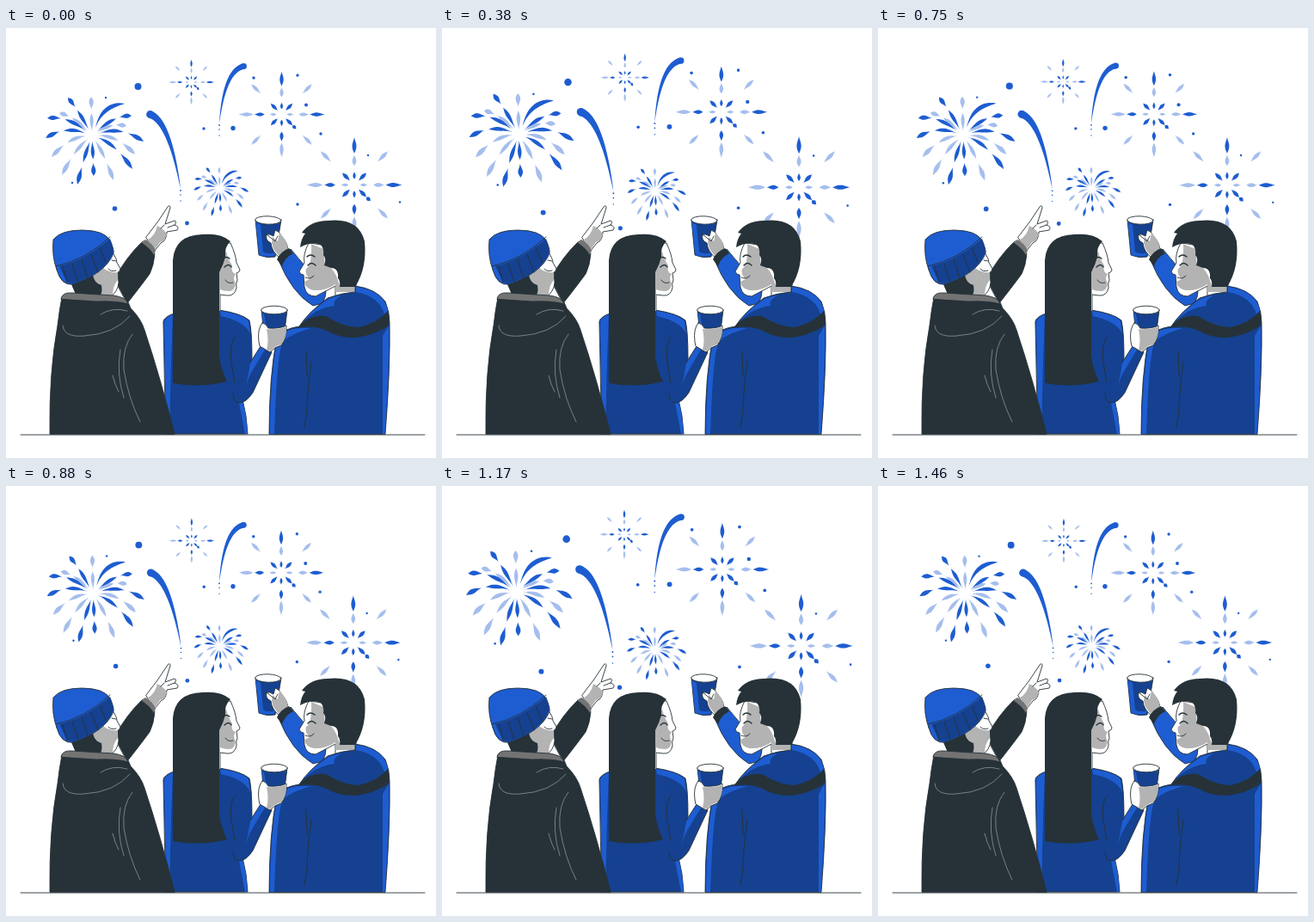
An HTML page with a canvas for the animation above (1500 ms loop, 500 px wide and 500 px high).

```html
<!DOCTYPE html>
<html>
<head>
<meta charset="utf-8">
<style>
html, body { margin: 0; width: 100%; height: 100%; overflow: hidden; background: #fff; }
canvas { display: block; width: 500px; height: 500px; }
</style>
</head>
<body>
<canvas id="stage"></canvas>
<script>
const canvas = document.getElementById('stage');
const ctx = canvas.getContext('2d');
const ratio = window.devicePixelRatio || 1;
canvas.width = canvas.height = 500 * ratio;

const BRIGHT = '#1e5dd1', DEEP = '#154190', PALE = '#a5beed';
const INK = '#263238', SHADE = '#b3b3b3', WHITE = '#fff', GREY = '#737373';
const LOOP = 1500, FPS = 24, FRAMES = 36;

function shape(d, fill, stroke = INK, width = 0.9) {
  const path = new Path2D(d);
  if (fill) { ctx.fillStyle = fill; ctx.fill(path); }
  if (stroke) { ctx.strokeStyle = stroke; ctx.lineWidth = width; ctx.stroke(path); }
}
const line = (d, color = INK, width = 0.9) => shape(d, null, color, width);
const flat = (d, color) => shape(d, color, null);

function dot(x, y, r, color = BRIGHT) {
  ctx.fillStyle = color;
  ctx.beginPath();
  ctx.arc(x, y, r, 0, 7);
  ctx.fill();
}

function rim(x, y, rx, ry, tilt) {
  const path = new Path2D();
  path.ellipse(x, y, rx, ry, tilt, 0, 7);
  shape(path, WHITE);
}

// Fills a ribbon along a quadratic curve between u = from and u = to.
function ribbon([ax, ay], [bx, by], [cx, cy], from, to, halfWidth, color) {
  const left = [], right = [], steps = 18;
  for (let i = 0; i <= steps; i++) {
    const v = i / steps, u = from + (to - from) * v, w = 1 - u;
    const x = w * w * ax + 2 * w * u * bx + u * u * cx;
    const y = w * w * ay + 2 * w * u * by + u * u * cy;
    const dx = w * (bx - ax) + u * (cx - bx), dy = w * (by - ay) + u * (cy - by);
    const k = halfWidth(v) / (Math.hypot(dx, dy) || 1);
    left.push([x - dy * k, y + dx * k]);
    right.unshift([x + dy * k, y - dx * k]);
  }
  ctx.fillStyle = color;
  ctx.beginPath();
  [...left, ...right].forEach(p => ctx.lineTo(...p));
  ctx.fill();
}

function arm(x, y, color) {
  const bend = [x * 0.5, y * 0.45 - Math.abs(x) * 0.3];
  const drop = size => v => size * Math.sin(Math.PI * v ** 1.4) ** 1.15;
  ribbon([0, 0], bend, [x, y], 0.13, 0.61, drop(2.1), color);
  ribbon([0, 0], bend, [x, y], 0.69, 1, drop(2.6), color);
}

function palm(x, y, scale) {
  ctx.save();
  ctx.translate(x, y);
  ctx.scale(scale, scale);
  [[-1, -46], [40, -12], [50, 21], [25, 51], [-35, 45], [-47, 24], [-38, -27]]
    .forEach(p => arm(...p, PALE));
  [[-54, 2], [-52, -21], [-28, -45], [46, -24], [60, 6], [47, 38], [-17, 56], [2, 46]]
    .forEach(p => arm(...p, BRIGHT));
  ribbon([4, -10], [12, -37], [38, -38], 0, 1, v => 2.5 * Math.sin(Math.PI * v ** 1.4) ** 0.8, BRIGHT);
  ctx.restore();
}

function burst(x, y, radius) {
  const ray = (angle, from, to, width, color, skew = 0.85) => {
    const at = r => [x + Math.cos(angle) * r * radius, y + Math.sin(angle) * r * radius];
    ribbon(at(from), at((from + to) / 2), at(to), 0, 1,
      v => width * radius * Math.sin(Math.PI * v ** skew) ** 1.3, color);
  };
  for (let i = 0; i < 4; i++) {
    const angle = i * Math.PI / 2, diagonal = angle + Math.PI / 4;
    const outer = i === 0 || i === 3 ? BRIGHT : PALE;
    ray(angle, 0.66, 1, 0.044, outer);
    ray(angle, 0.4, 0.63, 0.042, outer === BRIGHT ? PALE : BRIGHT);
    ray(angle, 0.12, 0.28, 0.03, i % 2 ? BRIGHT : PALE);
    ray(diagonal, 0.68, 1, 0.04, PALE, 1.2);
    ray(diagonal, 0.12, 0.36, 0.04, BRIGHT, 1.2);
  }
  ray(Math.PI / 4, 0.36, 0.48, 0.042, BRIGHT);
}

function trail(head, bend, tail, size) {
  ribbon(head, bend, tail, 0, 1, v => size * (1 - v) ** 0.8, BRIGHT);
  dot(...head, size);
  [2, 7, 14].forEach((gap, i) => dot(tail[0], tail[1] + gap, 0.9 - i * 0.1));
}

function sky() {
  palm(100, 126, 1);
  palm(248.5, 187.5, 0.56);
  burst(215.5, 63, 26.5);
  burst(320.5, 100.5, 50);
  burst(405, 182.5, 55.5);
  trail([167.5, 100.5], [190, 108], [203, 187], 4.4);
  trail([276.5, 44.5], [254, 49], [248, 111], 3.4);
  dot(153.5, 68, 4);
  dot(126.5, 210, 2.8);
  dot(210.5, 227, 2.4);
  dot(264, 116.5, 2.7);
  dot(349, 89.5, 2);
  [[230, 117], [288, 58], [339, 55], [366, 123], [339, 205]].forEach(p => dot(...p, 1.7));
  [[77, 180], [116, 81], [421, 148], [458, 202.5], [223, 70]].forEach(p => dot(...p, 1.2));
}

function woman() {
  shape('M183 341Q184 336 195 332L248 328Q274 332 283 340Q286 352 286 384L275 432Q280 450 281 472H186Z', DEEP);
  flat('M184 341Q186 336 194 333L192 385 190 472H186Z', BRIGHT);
  flat('M249 329Q275 333 282 341L284 356Q278 341 250 335Z', BRIGHT);
  flat('M271 436L278 472H280.5Q280 450 275 434Z', BRIGHT);
  shape('M284 389L296 370Q304 372 309 377L287 424Q279 436 271 436Q264 434 264 425', DEEP);
  flat('M284 390L296 371 301 374 285 401Q281 407 278 423Z', BRIGHT);
  line('M266 360Q259 370 262 389L266 412');

  shape('M250 250H261Q267 263 268 273L272 281Q272 284 268 285L269 293Q267 297 268 302Q266 312 257 311L249 310V329H243Z', WHITE);
  flat('M246 282L256 259Q258 269 263 276Q261 284 267 286Q263 291 267 297Q266 306 259 306Q253 306 249 304V329H244Z', SHADE);
  flat('M194 413V270Q196 241 228 240Q250 238 261 248Q254 254 255 266Q253 275 248 284V382Q251 400 257 411Q226 419 194 413Z', INK);
  line('M253 268Q256 265 260 268M254 278Q259 273 262 278', INK, 1.4);
  line('M255 293Q258 298 264 296');

  shape('M297 328L301 367H322L327 328Z', DEEP);
  flat('M297.5 331L300 333 303 350H300Z', BRIGHT);
  rim(312, 328, 15.3, 4.8, 0);
  shape('M298 343Q292 350 294 365L295 370 307 377Q312 371 320 369Q327 360 326 346Q318 350 305 349Q302 343 298 343Z', WHITE);
  flat('M303 350Q317 351 326 347Q327 359 320 368Q312 370 307 376L303 374Q306 364 303 350Z', SHADE);
}

function pointingMan() {
  shape('M163 243L176 226 188 208Q191 205 191 209L185 228 196 224Q199 225 196 229Q202 231 199 235L187 237Q187 247 180 250L172 260Z', WHITE);
  flat('M165 246Q173 242 176 230Q184 234 187 240Q185 248 179 249L172 259Z', SHADE);
  line('M184 229L180 233M196 229L188 232');
  shape('M126 292Q140 266 158 249L173 262Q172 276 167 286Q156 301 141 320Z', INK);
  flat('M157 249L162 246Q171 251 174 259L172 264Q167 255 157 249Z', GREY);

  shape('M112 270L123 260Q129 268 129 273L133 280Q132 284 130 284L131 296Q130 307 121 313L100 309Z', WHITE);
  flat('M101 289Q104 282 112 278Q119 285 130 284L130 293Q124 300 124 311L106 313Z', SHADE);
  flat('M72 288L101 281Q100 296 111 299Q113 309 107 314L82 312Q77 301 72 288Z', INK);
  line('M119 280Q122 284 128 282M123 270L128 271');
  shape('M59 281Q53 265 55 246Q64 235 88 235Q114 235 121 247Q126 258 125 262Q116 285 78 298Q64 300 59 281Z', BRIGHT);
  flat('M62 277Q92 270 121 245Q126 258 124 262Q115 285 78 297L71 296Z', DEEP);
  line('M58 277Q92 270 121 243M66 277L71 296M77 274L84 295M88 269L95 291M99 263L107 284M109 255L117 274');

  shape('M51 472Q50 400 60 346Q62 328 65 313L142 319L145 326Q157 338 161 351Q180 408 196 472Z', INK);
  shape('M64 315Q65 307 77 308L125 311Q140 313 142 321Q129 317 105 318Z', GREY);
  const seam = '#8d9497';
  line('M66 346Q67 360 91 358Q126 356 144 335M110 333Q124 324 141 329', seam, 0.8);
  line('M147 356Q135 371 137 397Q142 430 156 458M133 374Q128 402 137 430M124 404Q127 416 131 423', seam, 0.8);
}

function toastingMan() {
  shape('M290 223L294 264Q303 268 313 266L320 223Z', DEEP);
  flat('M290.5 226L294.5 264Q303 267 312 265L313 261Q304 264 299 260L296 229Z', BRIGHT);
  rim(304.8, 223.5, 15, 4.7, 0.03);
  shape('M303 240Q306 239 311 242L313 235Q318 236 321 243Q327 249 328 258L318 267Q309 260 308 250Q301 247 303 240Z', WHITE);
  flat('M310 243L316 248 318 238Q327 247 328 258L319 266Q311 260 309 250Z', SHADE);
  line('M303 240L313 248 316 242');
  shape('M317 270L331 257Q349 280 368 297Q376 305 368 320L357 323Q332 308 317 270Z', BRIGHT);
  flat('M315 269Q319 260 329 256L334 262Q324 267 321 277Z', INK);

  shape('M352 250Q345 263 347 273L341 283Q342 287 346 287L347 301Q349 312 360 312L383 300V312H406L410 260Z', WHITE);
  flat('M355 251L369 257 371 276Q378 276 384 288L388 299H407V307H383V298Q371 306 358 305Q348 303 347 295L353 292Q347 286 349 280Q356 276 355 251Z', SHADE);
  flat('M342 255Q343 245 348 239L344 238Q354 224 374 224Q410 220 417 248Q420 279 406 301H388Q389 294 386 291Q387 279 378 279L370 276Q373 268 369 264Q370 257 366 252Q355 248 342 255Z', INK);
  line('M350 266Q354 262 359 266M351 276Q355 271 360 276', INK, 1.4);
  line('M348 290Q354 293 358 288');

  shape('M306 472Q306 404 315 360Q321 350 341 347Q351 331 374 314Q390 308 406 307V300Q430 303 441 318Q446 330 446 343Q447 395 441 472Z', DEEP);
  flat('M307 472Q307 404 316 360Q321 352 340 349H355Q330 356 322 365Q315 377 312 472Z', BRIGHT);
  flat('M343 345Q354 329 375 315Q382 312 390 311Q379 317 382 323Q362 325 346 341Z', BRIGHT);
  flat('M407 301Q430 304 440 318Q444 326 444 330L440 333Q434 312 407 307Z', BRIGHT);
  flat('M438 358L445 346Q446 395 440.5 472H438Z', BRIGHT);
  flat('M339 349Q351 333 372 335Q393 348 410 348Q432 343 444 329Q447 340 444 347Q425 358 407 360Q388 361 373 352Q356 345 339 349Z', INK);
  line('M349 376L350 405M355 388Q350 426 350 444L347 464');
}

// Two beats per loop: rise, slow fall, rise, fall.
function beat(phase) {
  const p = phase % 1;
  if (p < 0.2) return 1 + p * 0.5;
  if (p < 0.6) return 1.1 - (p - 0.2) * 0.25;
  if (p < 0.8) return 1 + (p - 0.6) * 0.5;
  return 1.1 - (p - 0.8) * 0.5;
}

function draw(time) {
  const frame = Math.floor(((time % LOOP) + 4) * FPS / 1000) % FRAMES;
  const offset = 0.9;
  const scale = beat((frame + offset) / FRAMES) / beat(offset / FRAMES);
  ctx.setTransform(ratio, 0, 0, ratio, 0, 0);
  ctx.fillStyle = WHITE;
  ctx.fillRect(0, 0, 500, 500);
  ctx.lineJoin = ctx.lineCap = 'round';

  ctx.save();
  ctx.translate(257, 142);
  ctx.scale(scale, scale);
  ctx.translate(-257, -142);
  sky();
  ctx.restore();

  toastingMan();
  woman();
  pointingMan();
  line('M17 473H487');
}

const start = performance.now();
function tick() {
  draw(performance.now() - start);
  requestAnimationFrame(tick);
}
tick();
</script>
</body>
</html>
```
